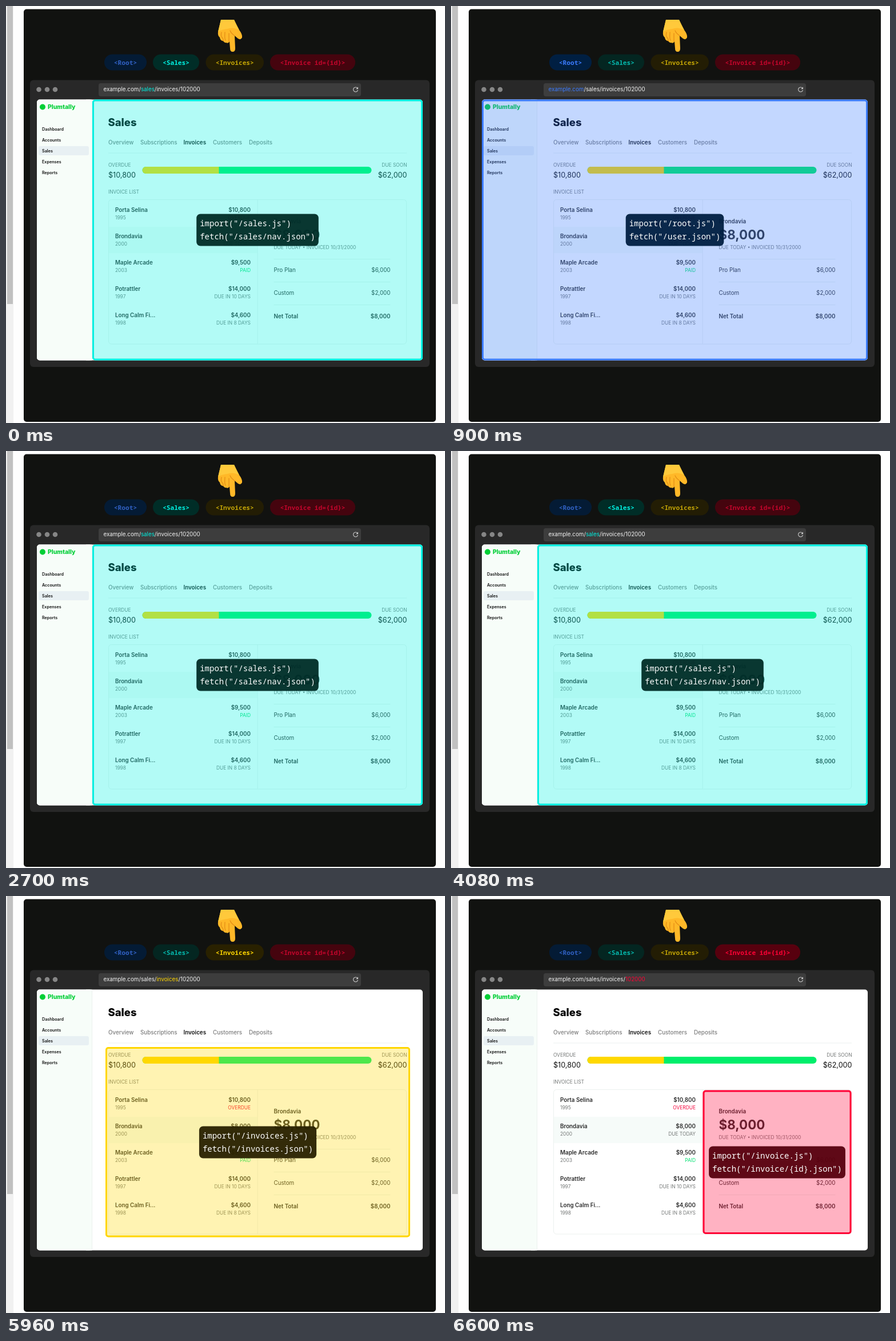
An HTML page for the animation above (8 s loop, 768 px wide and 729 px high).

```html
<!DOCTYPE html>
<html lang="en">
<meta charset="utf-8">
<title>Nested routes</title>
<style>
  html, body { margin: 0; width: 100%; height: 100%; overflow: hidden; background: #fefefe; }
  svg { display: block; width: 768px; height: 729px; font-family: Inter, sans-serif; white-space: pre; }
  .mono { font-family: "Noto Sans Mono", monospace; }
</style>
<svg id="stage" viewBox="0 0 768 729"></svg>
<script>
const INK = '#2c2c2c', GRAY = '#747776', LINE = '#ecf1ef';

// One entry per route: pill, URL part, overlay box and loading tip.
const routes = [
  { tag: '<Root>', pill: [172, 74], hue: '#3b7bff', dark: '#001f42', url: 'example.com',
    box: [54, 163.5, 675, 456], tip: [391.5, 363.5], code: ['import("/root.js")', 'fetch("/user.json")'] },
  { tag: '<Sales>', pill: [257, 81], hue: '#00f0e1', dark: '#002d27', url: 'sales',
    box: [151, 163.5, 578, 456], tip: [440, 363.5], code: ['import("/sales.js")', 'fetch("/sales/nav.json")'] },
  { tag: '<Invoices>', pill: [349.5, 101.5], hue: '#ffd600', dark: '#292100', url: 'invoices',
    box: [174, 264, 533, 332.5], tip: [440.5, 402.5], code: ['import("/invoices.js")', 'fetch("/invoices.json")'] },
  { tag: '<Invoice id={id}>', pill: [462, 149], hue: '#ff0035', dark: '#57000e', url: '102000',
    box: [440.5, 339.5, 260, 251.5], tip: [570.5, 437.5], code: ['import("/invoice.js")', 'fetch("/invoice/{id}.json")'] },
];
const cuts = [[0, 1], [900, 0], [2700, 1], [5000, 2], [6600, 3]];

const esc = s => s.replace(/</g, '&lt;').replace(/>/g, '&gt;');
const rect = (x, y, w, h, fill, r = 0, more = '') =>
  `<rect x="${x}" y="${y}" width="${w}" height="${h}" rx="${r}" fill="${fill}" ${more}/>`;
const line = (x1, y1, x2, y2) => `<path d="M${x1} ${y1}L${x2} ${y2}" stroke="${LINE}"/>`;
// y is the middle of the capitals.
const text = (s, x, y, size, fill, weight = 400, anchor = 'start', more = '') =>
  `<text x="${x}" y="${y + size * .364}" font-size="${size}" fill="${fill}" font-weight="${weight}" text-anchor="${anchor}" ${more}>${esc(s)}</text>`;
const body = (s, x, y, fill = INK, weight = 400, anchor) => text(s, x, y, 9.8, fill, weight, anchor);
const label = (s, x, y, fill = GRAY, anchor) => text(s, x, y, 8.4, fill, 400, anchor);

function hand() {
  return `<g fill="#ffb828">
    <path d="M376 24H399Q402 33 408 42Q414 50 413 55Q411 60 406 57L400 52L401 74Q401 80 396.500 80Q392 80 392 74L391 62
      Q389 66 385 64Q382 65 380 61Q375 61 374 55Q370 52 371 45Z"/>
    <path d="M376 24H399L408 42Q397 36 387 40Q377 41 371 45Z" fill="#ffc93b"/>
    <path d="M377 46Q375 53 379 56M383 46Q382 57 384 60M390 48V62M379 56Q380 58 380 61M400 52Q394 48 392 43" fill="none" stroke="#e58f16" stroke-width="1.300" stroke-linecap="round"/>
  </g>`;
}

function sidebar() {
  const items = ['Dashboard', 'Accounts', 'Sales', 'Expenses', 'Reports'];
  return rect(54, 163.5, 97, 456, '#f7fdf9', 5) + rect(140, 163.5, 10.5, 456, '#f7fdf9') +
    line(150.5, 164, 150.5, 619) +
    '<circle cx="64" cy="176.500" r="5" fill="#00cf36"/>' +
    text('Plumtally', 73, 176.5, 10.4, '#00cf36', 800) +
    rect(57, 245, 88, 16, '#e8f0f3', 3) +
    items.map((s, i) => text(s, 63, 215 + 19 * i, 7.2, '#111', 600)).join('');
}

function invoices() {
  const rows = [
    ['Porta Selina', 1995, '$10,800', 'OVERDUE', '#f5003a'],
    ['Brondavia', 2000, '$8,000', 'DUE TODAY'],
    ['Maple Arcade', 2003, '$9,500', 'PAID', '#00df70'],
    ['Potrattler', 1997, '$14,000', 'DUE IN 10 DAYS'],
    ['Long Calm Fi...', 1998, '$4,600', 'DUE IN 8 DAYS'],
  ];
  return rect(180, 386, 260, 46, '#f6fbf9') +
    rect(179.5, 338.5, 521, 252.5, 'none', 5, `stroke="${LINE}"`) + line(440, 339, 440, 591) +
    rows.map(([name, year, sum, state, fill], i) => {
      const y = 356 + 46.1 * i;
      return body(name, 191, y, INK, 600) + label('' + year, 191, y + 14) +
        body(sum, 428, y, INK, 600, 'end') + label(state, 428, y + 14, fill, 'end');
    }).join('');
}

function detail() {
  const rows = [['Pro Plan', '$6,000'], ['Custom', '$2,000'], ['Net Total', '$8,000', 600]];
  return body('Brondavia', 468.5, 376, INK, 600) +
    text('$8,000', 468.5, 399.5, 22.4, INK, 700) +
    label('DUE TODAY • INVOICED 10/31/2000', 468.5, 422) +
    rows.map(([name, sum, weight], i) => {
      const y = 461.5 + 40.4 * i;
      return line(468.5, Math.round(y - 20) + .5, 672.5, Math.round(y - 20) + .5) +
        body(name, 468.5, y, INK, weight) + body(sum, 672.5, y, INK, weight, 'end');
    }).join('');
}

function page() {
  const tabs = [['Overview', 179], ['Subscriptions', 235], ['Invoices', 310.5, 1], ['Customers', 362], ['Deposits', 425]];
  return rect(54, 163.5, 675, 456, '#fff', 5) + sidebar() +
    text('Sales', 178.5, 203.5, 18.5, '#000', 800) +
    tabs.map(([s, x, on]) => body(s, x, 238.5, on ? '#111' : '#7b7b7b', on ? 600 : 500)).join('') +
    line(179, 257, 701, 257) +
    label('OVERDUE', 179, 277.5) + text('$10,800', 179, 295.5, 12.6, '#111') +
    label('DUE SOON', 701.5, 277.5, GRAY, 'end') + text('$62,000', 701.5, 295.5, 12.6, '#111', 400, 'end') +
    rect(238.5, 281, 401, 12, '#00ee6b', 6) +
    '<path d="M372.500 281H244.500a6 6 0 0 0 0 12H372.500Z" fill="#ffd800"/>' +
    label('INVOICE LIST', 179, 325) + invoices() + detail();
}

function browser() {
  return rect(42, 129.5, 699, 501.5, '#282828', 6) +
    [57.5, 72, 86].map(x => `<circle cx="${x}" cy="146" r="4.300" fill="#868686"/>`).join('') +
    rect(162, 135, 459, 23, '#3d3d3d', 4) +
    '<path d="M614.800 143.600A4 4 0 1 0 615.500 147" fill="none" stroke="#ccc" stroke-width="1.100"/><path d="M616 141.500V145.300H612.200Z" fill="#ccc"/>';
}

function pill(route, on) {
  const [x, w] = route.pill;
  return `<g opacity="${on ? 1 : .75}">` + rect(x, 84.5, w, 28, route.dark, 14) +
    text(route.tag, x + w / 2, 98.5, 11.2, route.hue, 600, 'middle', 'class="mono"') + '</g>';
}

function url(active) {
  const parts = routes.map(r => r === active ? `<tspan fill="${r.hue}">${r.url}</tspan>` : r.url);
  return `<text x="170.500" y="149.300" font-size="9.800" fill="#f2f2f2">${parts.join('/')}</text>`;
}

function overlay({ hue, dark, box: [x, y, w, h], tip: [cx, top], code }) {
  const width = code[1].length * 8.4 + 12, left = cx - width / 2;
  return rect(x, y, w, h, hue, 5, 'opacity=".3"') +
    rect(x + 1.5, y + 1.5, w - 3, h - 3, 'none', 3.5, `stroke="${hue}" stroke-width="3"`) +
    rect(left, top, width, 56, dark, 7, 'opacity=".95"') +
    code.map((s, i) => text(s, left + 6, top + 16.5 + 23 * i, 14, '#fff', 400, 'start', 'class="mono"')).join('');
}

const backdrop = rect(0, 0, 13, 729, '#f1f1f1') + rect(2, 0, 10, 521, '#c1c1c1') +
  rect(31, 5.5, 721, 721.5, '#111210', 5) + hand() + browser() + page();

const stage = document.getElementById('stage');
stage.innerHTML = backdrop + '<g id="live"></g>';
const live = document.getElementById('live');
let shown;

function draw(now) {
  const t = now % 8000;
  const active = routes[cuts.findLast(([at]) => t >= at)[1]];
  if (active !== shown) {
    live.innerHTML = routes.map(r => pill(r, r === active)).join('') + url(active) + overlay(active);
    shown = active;
  }
  requestAnimationFrame(draw);
}
draw(performance.now());
</script>
</html>
```
